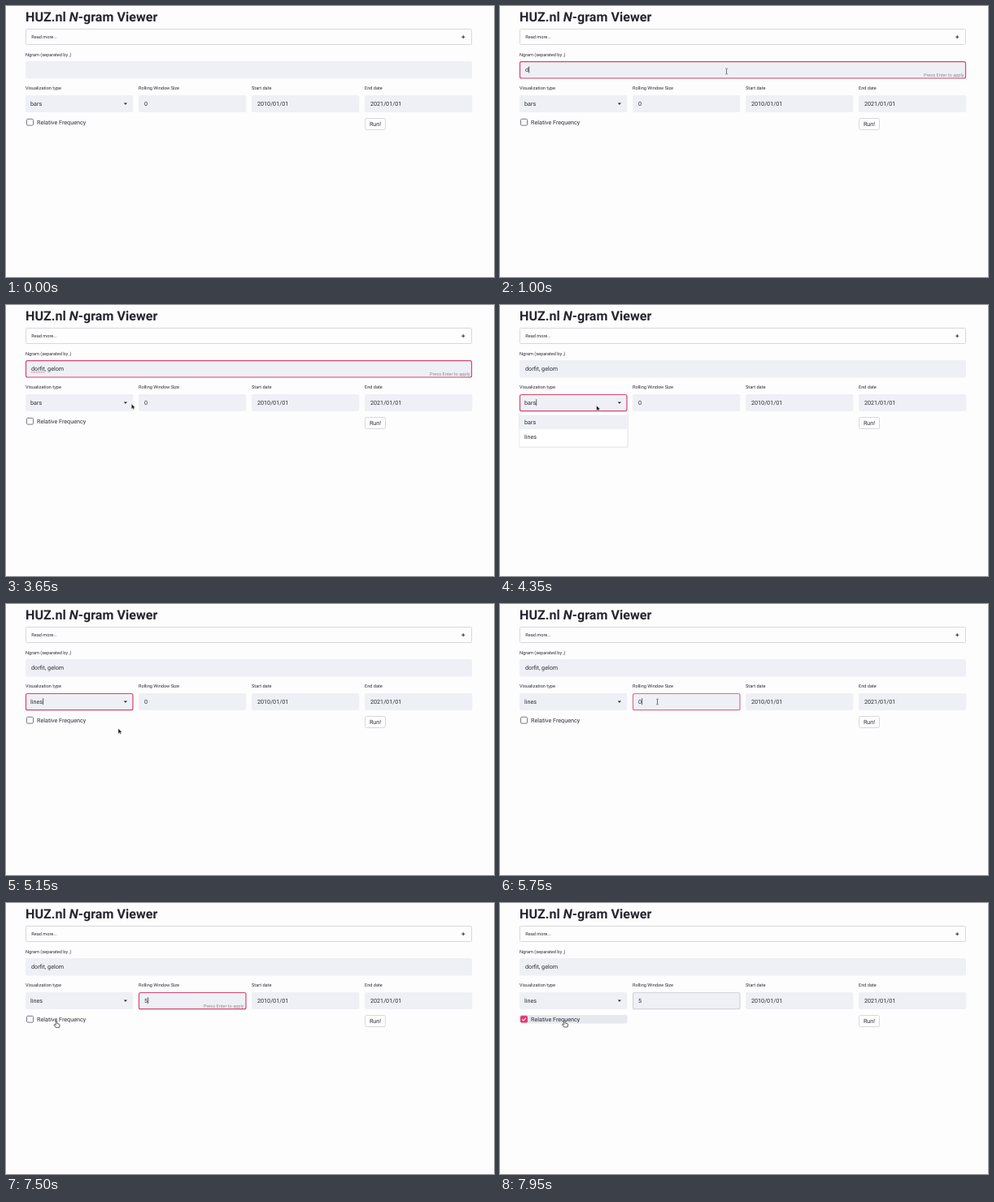
An HTML page for the animation above (8000 ms loop, 600x334 px).

```html
<!DOCTYPE html>
<html lang="en">
<head>
<meta charset="utf-8">
<title>N-gram Viewer</title>
<style>
html, body { margin: 0; width: 100%; height: 100%; overflow: hidden; background: #fefdfe; }
svg { display: block; }
text { font: 7.2px Roboto, "IBM Plex Sans", sans-serif; fill: #2b2d36; white-space: pre; text-rendering: geometricPrecision; }
.title { font-size: 16.1px; font-weight: 700; fill: #25262e; }
.small { font-size: 5.6px; }
.hint { font-size: 5.6px; fill: #8b8c96; text-anchor: end; }
.field { fill: #eff0f5; }
.line { fill: none; stroke: #d8d8dc; }
.focus { fill: none; stroke: #d5466f; stroke-width: 1.2; }
</style>
</head>
<body>
<svg width="600" height="334" viewBox="0 0 600 334">
  <text class="title" x="24" y="19">HUZ.nl <tspan font-style="italic">N</tspan>-gram Viewer</text>

  <rect class="line" x="24.5" y="28.5" width="548" height="19" rx="1"/>
  <text class="small" x="31.3" y="40">Read more...</text>
  <path d="M560.2 38.2h4M562.2 36.2v4" stroke="#333"/>

  <text class="small" x="24" y="62">Ngram (separated by ,)</text>
  <rect class="field" x="24" y="68" width="549" height="21.5" rx="2"/>
  <text id="query" x="31" y="81"></text>
  <path id="squiggle" stroke="#d33" stroke-width=".7" stroke-dasharray="1 .5"/>
  <text id="queryHint" class="hint" x="570.5" y="87">Press Enter to apply</text>
  <rect id="queryFocus" class="focus" x="24.5" y="68.6" width="548" height="20.4" rx="2"/>

  <g id="columns"></g>
  <text id="kind" x="30" y="122.7"></text>
  <path d="M144.8 119.6h4.2l-2.1 2.2z" fill="#222"/>
  <rect id="kindFocus" class="focus" x="24.5" y="110.5" width="131.5" height="20.2" rx="2"/>
  <text id="size" x="170" y="122.7"></text>
  <text id="sizeHint" class="hint" x="292.5" y="128.6">Press Enter to apply</text>
  <rect id="sizeFocus" class="focus" x="163.5" y="110.5" width="131.5" height="20.2" rx="2"/>
  <text x="309" y="122.7">2010/01/01</text>
  <text x="448" y="122.7">2021/01/01</text>

  <rect id="glow" x="24" y="138" width="132.5" height="10.5" rx="2" fill="#e6e9ed"/>
  <rect id="box" x="25.5" y="139.3" width="8" height="7.8" rx="1.2" stroke="#6b6c76" stroke-width=".9"/>
  <path id="tick" d="M27.3 143.3l1.6 1.7 3-3.4" fill="none" stroke="#fff" stroke-width="1.1"/>
  <text x="38" y="145.7">Relative Frequency</text>
  <rect class="line" x="441.5" y="138.5" width="25" height="14" rx="2"/>
  <text x="454" y="148" text-anchor="middle">Run!</text>

  <g id="menu">
    <rect x="23" y="132.5" width="135" height="43.5" rx="2" fill="#000" opacity=".07"/>
    <rect x="24" y="132" width="132.5" height="42.5" rx="2" fill="#fff"/>
    <rect id="option" class="field" x="24" width="132.5" height="17.5"/>
    <text x="30" y="147">bars</text>
    <text x="30" y="164.5">lines</text>
  </g>

  <path id="caret" stroke="#222" stroke-width=".7"/>
  <g id="pointer">
    <path id="arrow" d="M0 0v6.2l1.5-1.3 1 2.1 1.1-.5-1-2h2z" fill="#111" stroke="#fff" stroke-width=".4"/>
    <path id="beam" d="M-1.5-3.5q1.5 0 1.5 1v5q0 1-1.5 1M1.5-3.5q-1.5 0-1.5 1v5q0 1 1.5 1" fill="none" stroke="#666" stroke-width=".7"/>
    <path id="hand" d="M-.8.6q.8-1.2 1.6 0v3l2.6.6q.8.3.7 1.2l-.5 3h-4.4l-2.2-3q0-1.1 1.2-.6l1 .8z" fill="#fff" stroke="#222" stroke-width=".7"/>
  </g>
</svg>
<script>
const LOOP = 8000, STEP = 50;
const phrase = "dorfit, gelom", wordLength = 6;
const keyTimes = [950, 1100, 1200, 1400, 1650, 1850, 2050, 2100, 2200, 2250, 2450, 2500, 2600];
// time, x, y
const travel = [
  [150, 278.5, 91], [250, 278.5, 80.5], [3200, 278.5, 80.5], [3400, 215, 113], [3550, 168, 132],
  [3650, 154.3, 122], [3800, 120, 121], [4300, 120, 121], [4600, 112, 139], [4750, 112, 139],
  [4900, 105, 160], [5000, 105, 160], [5150, 138, 153.5], [5250, 140, 153], [5550, 193.5, 120.5],
  [7350, 193.5, 120.5], [7500, 62, 145], [7650, 62, 145], [7800, 72, 149], [7950, 79.5, 144.5]
];

const $ = id => document.getElementById(id);
const set = (id, name, value) => $(id).setAttribute(name, value);
const fade = (id, value) => set(id, "opacity", +value);
const within = (t, a, b) => t >= a && t < b;
const ramp = (t, a, b) => Math.min(1, Math.max(0, (t - a) / (b - a)));
const pulse = (t, a, b, rise = 150) => ramp(t, a, a + rise) * (1 - ramp(t, b, b + rise));

$("columns").innerHTML = ["Visualization type", "Rolling Window Size", "Start date", "End date"]
  .map((label, i) => {
    const x = 24 + 139 * i;
    return `<text class="small" x="${x}" y="103">${label}</text>
      <rect class="field" x="${x}" y="110" width="132.3" height="21" rx="2"/>`;
  }).join("");

function place(t) {
  let i = travel.findIndex(key => key[0] > t);
  if (i < 0) return travel.at(-1).slice(1);
  if (i === 0) return travel[0].slice(1);
  const [t0, x0, y0] = travel[i - 1], [t1, x1, y1] = travel[i];
  const k = (t - t0) / (t1 - t0);
  return [x0 + (x1 - x0) * k, y0 + (y1 - y0) * k];
}

function drawCaret(t) {
  const shown = within(t, 200, 750) || within(t, 950, 3200) || within(t, 3700, 4000) ||
    within(t, 4250, 4600) || within(t, 5050, 5600) ||
    within(t, 5750, 6650) || within(t, 7150, 7650);
  fade("caret", shown);
  const id = t < 4000 ? "query" : t < 5600 ? "kind" : "size";
  const x = +$(id).getAttribute("x") + $(id).getComputedTextLength() + .6;
  set("caret", "d", `M${x} ${id === "query" ? 74.5 : 116.2}v8`);
}

function drawPointer(t) {
  const [x, y] = place(t);
  set("pointer", "transform", `translate(${x} ${y})`);
  fade("pointer", within(t, 150, 2150) || t >= 3200);
  const beam = t < 3300 || within(t, 5500, 7400);
  const hand = t >= 7450;
  fade("beam", beam);
  fade("hand", hand);
  fade("arrow", !beam && !hand);
}

function draw(t) {
  const typed = keyTimes.filter(time => time <= t).length;
  $("query").textContent = phrase.slice(0, typed);
  fade("queryFocus", pulse(t, 100, 4000));
  fade("queryHint", within(t, 950, 4050));
  const marked = within(t, 3300, 4050);
  fade("squiggle", marked);
  if (marked) set("squiggle", "d", `M31 82.8h${$("query").getSubStringLength(0, wordLength)}`);

  $("kind").textContent = t < 5000 ? "bars" : "lines";
  fade("kindFocus", pulse(t, 4000, 5600));
  fade("menu", pulse(t, 4150, 5000, 100));
  set("option", "y", t < 4850 ? 135.5 : 153);

  $("size").textContent = t < 6300 ? "0" : "5";
  const left = t >= 7650;
  fade("sizeFocus", left ? 1 - .5 * ramp(t, 7650, 7900) : ramp(t, 5600, 5800));
  $("sizeFocus").style.stroke = t >= 7750 ? "#b9bac0" : "";
  fade("sizeHint", within(t, 6300, 7700));

  const checked = t >= 7750;
  fade("glow", left);
  fade("tick", checked);
  set("box", "fill", checked ? "#e23a70" : "#fefdfe");
  set("box", "stroke", checked ? "#e23a70" : "#6b6c76");

  drawCaret(t);
  drawPointer(t);
}

const start = performance.now();
function frame() {
  const t = (performance.now() - start) % LOOP;
  draw(Math.floor(t / STEP) * STEP);
  requestAnimationFrame(frame);
}
frame();
</script>
</body>
</html>
```
